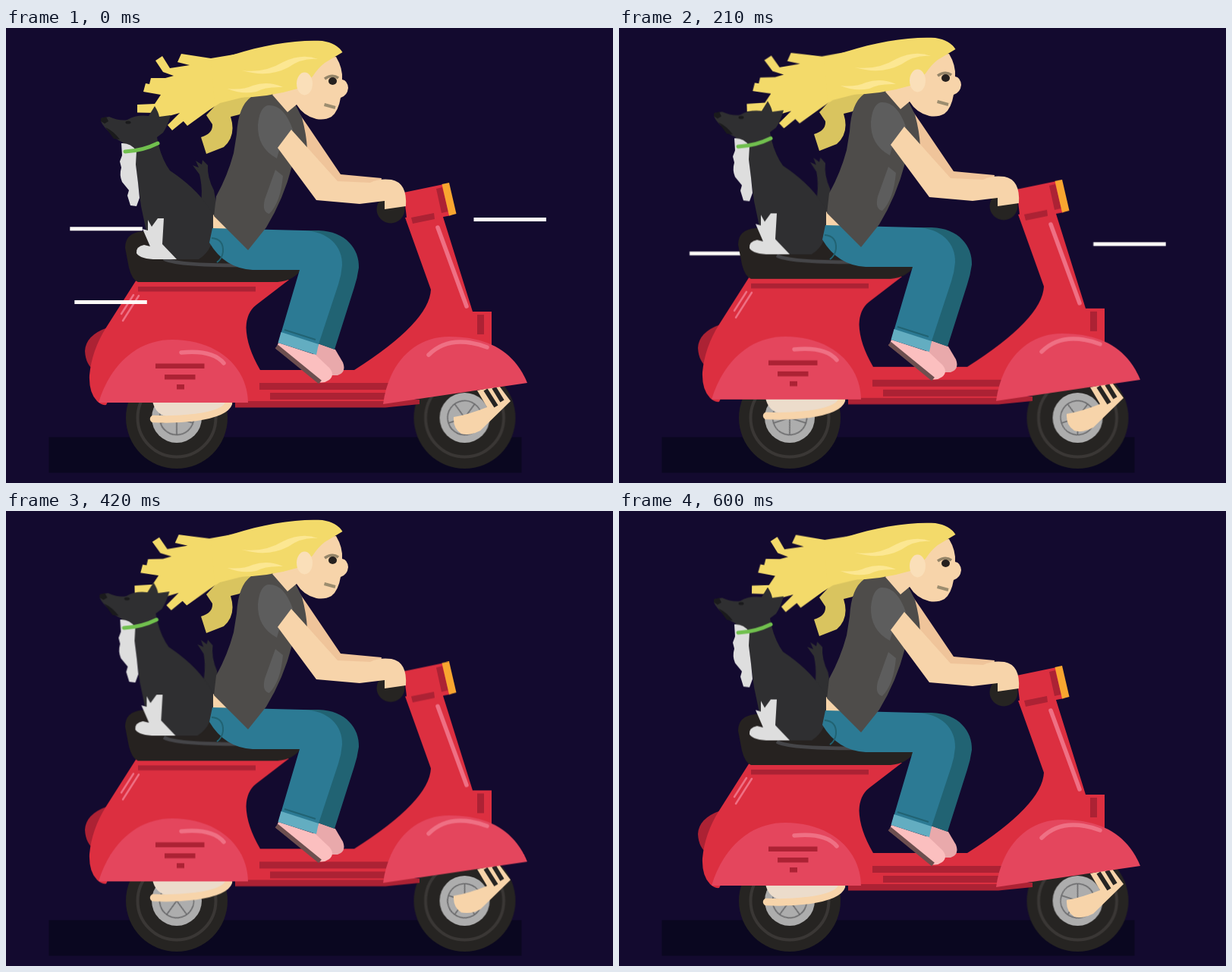
Recreate the animation shown at these times as an HTML page. Size 800x600 px, loop 660 ms.

```html
<!DOCTYPE html>
<html lang="en">
<head>
<meta charset="utf-8">
<title>Scooter ride</title>
<style>
html, body { margin: 0; width: 100%; height: 100%; overflow: hidden; background: #130a2f; }
svg { display: block; width: 100vw; height: 100vh; }

/* Poses k0..k4 are 150 ms apart, each reached in five steps; the last one holds. */
.bob { animation: bob 660ms steps(5) infinite; }
@keyframes bob {
  0% { transform: var(--k0, translate(0px, 0px)); }
  22.7273% { transform: var(--k1); }
  45.4545% { transform: var(--k2); }
  68.1818% { transform: var(--k3); }
  90.9091%, 100% { transform: var(--k4); }
}
.scooter {
  --k1: translate(0px, -7px); --k2: translate(0px, 0px);
  --k3: translate(0px, -7px); --k4: translate(0px, 0px);
}
.rider {
  --k1: translate(0px, -6px); --k2: translate(0px, -1px);
  --k3: translate(0px, -6px); --k4: translate(0px, -1px);
}
.dog {
  --k1: translate(0px, -11px); --k2: translate(0px, 0px);
  --k3: translate(-2px, -11px); --k4: translate(0px, -2.5px);
}
.tail {
  transform-origin: 264px 245px;
  --k0: translate(0px, 0px) rotate(0deg);
  --k1: translate(3px, 6px) rotate(5deg); --k2: translate(1px, 0px) rotate(1deg);
  --k3: translate(4px, 6px) rotate(5deg); --k4: translate(1px, 1px) rotate(1deg);
}
.strands {
  transform-origin: 300px 80px;
  --k0: matrix(1, 0, 0, 1, 0, 0);
  --k1: matrix(1.077, -.054, .059, .964, 0, 0);
  --k2: matrix(.987, .009, -.01, 1.006, 0, 0);
  --k3: matrix(1.043, -.03, .033, .98, 0, 0);
  --k4: matrix(.98, .015, -.017, 1.01, 0, 0);
}

.spin { animation: spin 660ms steps(20) infinite; }
@keyframes spin {
  0% { transform: rotate(0deg); }
  90.9091%, 100% { transform: rotate(720deg); }
}

/* Speed lines: appear, hop once, vanish. */
.streak { fill: #fdfbf8; animation: hop 660ms step-end infinite; }
.late { animation-delay: -600ms; }
@keyframes hop {
  0% { transform: translate(0px, 0px); opacity: 1; }
  9.0909% { transform: translate(8.7px, 13.3px); opacity: 1; }
  27.2727%, 100% { transform: translate(8.7px, 13.3px); opacity: 0; }
}

.red { fill: #dc2f40; }
.dark { fill: #ac2234; }
.fender { fill: #e4465d; }
.shine { fill: none; stroke: #ef7084; stroke-width: 5.5; stroke-linecap: round; }
.skin { fill: #f7d4aa; }
.hair { fill: #f3da6a; }
.glow { fill: #fce792; }
.jeans { fill: #2c7a94; }
.denim { fill: #216373; }
.seam { fill: none; stroke: #216373; stroke-width: 2; }
.fur { fill: #2f2f31; }
.white { fill: #dedede; }
</style>
</head>
<body>
<svg viewBox="0 0 800 600" preserveAspectRatio="none">
  <defs>
    <g id="wheel">
      <circle r="67" fill="#262422"/>
      <circle r="51.5" fill="none" stroke="#3a3735" stroke-width="4"/>
      <circle r="33" fill="#adadad"/>
      <g class="spin" fill="none" stroke="#69696b" stroke-width="1.6">
        <circle r="22.5"/>
        <path id="spoke" d="M0 0V-22.5"/>
        <use href="#spoke" transform="rotate(72)"/>
        <use href="#spoke" transform="rotate(144)"/>
        <use href="#spoke" transform="rotate(216)"/>
        <use href="#spoke" transform="rotate(288)"/>
      </g>
    </g>
  </defs>

  <rect width="800" height="600" fill="#130a2f"/>
  <rect x="56.5" y="539.5" width="623" height="47" fill="#0a0720"/>

  <rect class="streak" x="84.3" y="262.3" width="95.5" height="5"/>
  <rect class="streak late" x="84.3" y="281.5" width="95.5" height="5"/>
  <rect class="streak" x="616.5" y="250" width="95.5" height="5"/>
  <rect class="streak late" x="616.5" y="269.2" width="95.5" height="5"/>

  <use href="#wheel" x="225" y="514"/>
  <use href="#wheel" x="604.5" y="514"/>

  <g class="bob scooter">
    <!-- engine cover and fork -->
    <path fill="#ecdccb" d="M193 492H291Q286 512 262 513H216Q197 511 193 492Z"/>
    <path d="M194.500 515.500Q222 517 250 513.500Q289 508 293.500 495" fill="none" stroke="#f7d4aa" stroke-width="9.500" stroke-linecap="round"/>
    <path class="skin" d="M621 478L650 472L665 492L625 531Q612 538 600 535Q589 528 590 513Q612 509 634 500Z"/>
    <path d="M632 477L646 499M643 474L654 492" stroke="#262422" stroke-width="6"/>

    <!-- body -->
    <path class="dark" d="M302 490H545V496L500 500.500H302Z"/>
    <path class="dark" d="M134 395Q105 405 104 426Q105 445 118 453Z"/>
    <path class="red" d="M172 332L132 395Q113 425 110 458Q109 481 120 492Q126 498 132 497L134 493H302V492H520L600 440H640V374H615L575 246L526 250L560 345Q558 388 459 451H335Q317 420 316.500 395Q317 375 330 365L373 332Z"/>
    <rect class="dark" x="621" y="378" width="9" height="26"/>
    <path class="dark" d="M334 468H506V477H334ZM348 481H506V490H348Z"/>
    <rect class="dark" x="174" y="341" width="155" height="6.500"/>
    <path class="shine" style="stroke-width:2.500" d="M152 377L168 352M154 386L175 353"/>

    <!-- fenders -->
    <path class="fender" d="M122 494C137 444 173 411 219 411C278 411 318 446 319 494Z"/>
    <path class="shine" d="M231 428Q272 424 287 442"/>
    <path class="dark" d="M197 442.500H261.500V449H197ZM209 457H249.500V463.500H209ZM225 470H235V476.500H225Z"/>
    <path class="fender" d="M497 496C504 443 537 407 584 407C632 407 669 424 687 468Z"/>
    <path class="shine" d="M557 431Q585 403 634 421"/>

    <!-- handlebar -->
    <path class="shine" d="M569 263L607 367"/>
    <circle cx="507" cy="239" r="18.500" fill="#262422"/>
    <path class="red" d="M524 217L577 206L587 247L529 258Z"/>
    <path class="dark" d="M567 212L575 210L583 242L574 244ZM534 250L564 244L565 252L536 258Z"/>
    <path fill="#f9a630" d="M574.500 206L584 204L593.500 245L584 247.500Z"/>

    <!-- seat -->
    <path fill="#262220" d="M180 268Q157 270 157 290L162 316Q166 332 174 335H358Q380 333 389 318L300 298L270 265Z"/>
    <path d="M208 304Q222 313 310 313" fill="none" stroke="#454548" stroke-width="4.500"/>
  </g>

  <rect class="streak" x="90.300" y="359" width="95.500" height="5"/>

  <!-- wind-blown hair -->
  <g class="bob rider">
    <path fill="#d9c45f" d="M280 98Q298 86 328 89L308 114L296 117Q304 142 287 157L264 166L257 144Q273 139 272 127L264 115Z"/>
    <path class="bob strands hair" d="M312 33L270 40L231 34L226 45L242 49L216 53L206 37L197 43L207 58L221 63L210 66L191 66L189 74L184 73L181 84L204 88L196 100L173 101V111.500L198 112L193 118L204 119L229 112L213 128L219 135L246 113L233 122L239 129L268 108L282 99L314 91Z"/>
  </g>

  <g class="bob dog">
    <path class="bob tail fur" d="M252 250Q262 222 255 193L246 181L254 184L250 175L258 180L259 174L266 181Q265 197 274 214Q279 235 275 260Z"/>
    <path class="fur" d="M125 119L136 117Q150 123 160 121Q172 114 188 116L196 103Q201 111 202 117L217 115Q213 129 207 138L199 144Q200 150 201 154Q206 174 216 188Q249 210 266 235Q275 246 275 260Q275 292 254 305H222L190 292L178 235L169 167L156 162L154 151Q143 146 138 139Q128 130 125 123Z"/>
    <path d="M125 119L132 117L135 123L130 126L125 123ZM131 131Q142 136 150 147L142 146Z" fill="#1a1a1c"/>
    <ellipse cx="161" cy="124.500" rx="3.500" ry="2" fill="#1a1a1c"/>
    <path class="white" d="M152 152Q164 151 172 162L171 180L174 204L176 224L172 235L164 234L160 221L162 214L153 203Q149 194 152 184L150 176L153 168Z"/>
    <path class="white" d="M187 253L192 262L200 251H208L206 285L225 305H204Q178 306 172 297Q171 288 182 286L190 288L180 265L187 267Z"/>
    <path d="M157 163Q180 162 200 152" fill="none" stroke="#71c04e" stroke-width="5" stroke-linecap="round"/>
  </g>

  <g class="bob rider">
    <!-- legs and shoes -->
    <path fill="#e9a9ab" d="M411 416L434 424L444 441Q449 454 437 458H428L405 430Z"/>
    <path class="denim" d="M388 267H412C448 268 466 292 465 316Q463 330 459 342L433 424L408 415Z"/>
    <path fill="#fbbfbf" d="M359 415L408 431L426 448Q434 457 426 464Q419 469 412 467L356 423Z"/>
    <path d="M356.500 420L414 467" stroke="#6d4f4f" stroke-width="6"/>
    <path class="skin" d="M273 246L296 268H273Z"/>
    <path class="jeans" d="M272 264L392 267C425 268 444 288 443 313Q442 326 438 338L411 420L362 404L387 319H325Q288 317 268 283Z"/>
    <path fill="#63adc1" d="M362.500 401L412 417L409 431L358.500 415Z"/>
    <path class="seam" d="M367 398L408 411M271 277Q287 278 286 295Q285 304 278 309"/>

    <!-- far arm, shirt, near arm -->
    <path fill="#efc49a" d="M388 115L397 128L441 193L495 198L492 212L430 212L378 150Z"/>
    <path fill="#4e4c4a" d="M323 91Q306 103 304 140L300 165Q292 195 277 222L274 248L319 293L343 263Q366 225 377 182L397 160Q396 140 390 118L380 98L354 88Q336 87 323 91Z"/>
    <path fill="#5d5d5d" d="M345 102Q366 100 378 134L361 158L357 172Q331 158 332 128Q334 105 345 102ZM355 187L365 195Q362 230 347 245Q337 243 341 226Z"/>
    <path class="skin" d="M376 134L358 158L409 227L466 232L499 228V239L527 235Q529 204 508 200Q491 198 480 204L437 202Z"/>

    <!-- head -->
    <path class="skin" d="M351 88L371 111L383 101Q392 116 409 120Q420 122 429 117Q438 110 441 92Q450 89 451 79Q450 69 443 68Q444 53 435 38L395 40Z"/>
    <path class="hair" d="M443.500 32Q436 20 417 17C385 15 340 22 300 35L270 44L275 100L300 92Q345 92 384 80L404 64Q411 53 420 46Z"/>
    <path class="glow" d="M311 56Q340 60 365 45Q390 33 411 41Q390 39 372 52Q345 66 311 56ZM292 80Q312 82 325 76Q345 69 365 78Q342 77 330 84Q310 88 292 80Z"/>
    <ellipse cx="393.500" cy="73.500" rx="10.500" ry="15" fill="#fadfb9"/>
    <path d="M420 67Q430 60 438 66" fill="none" stroke="#948468" stroke-width="3.500"/>
    <ellipse cx="430.500" cy="70" rx="5.500" ry="5" fill="#26211f"/>
    <path d="M419.500 101L434 105" stroke="#9c8d6f" stroke-width="4"/>
  </g>
</svg>
</body>
</html>
```
